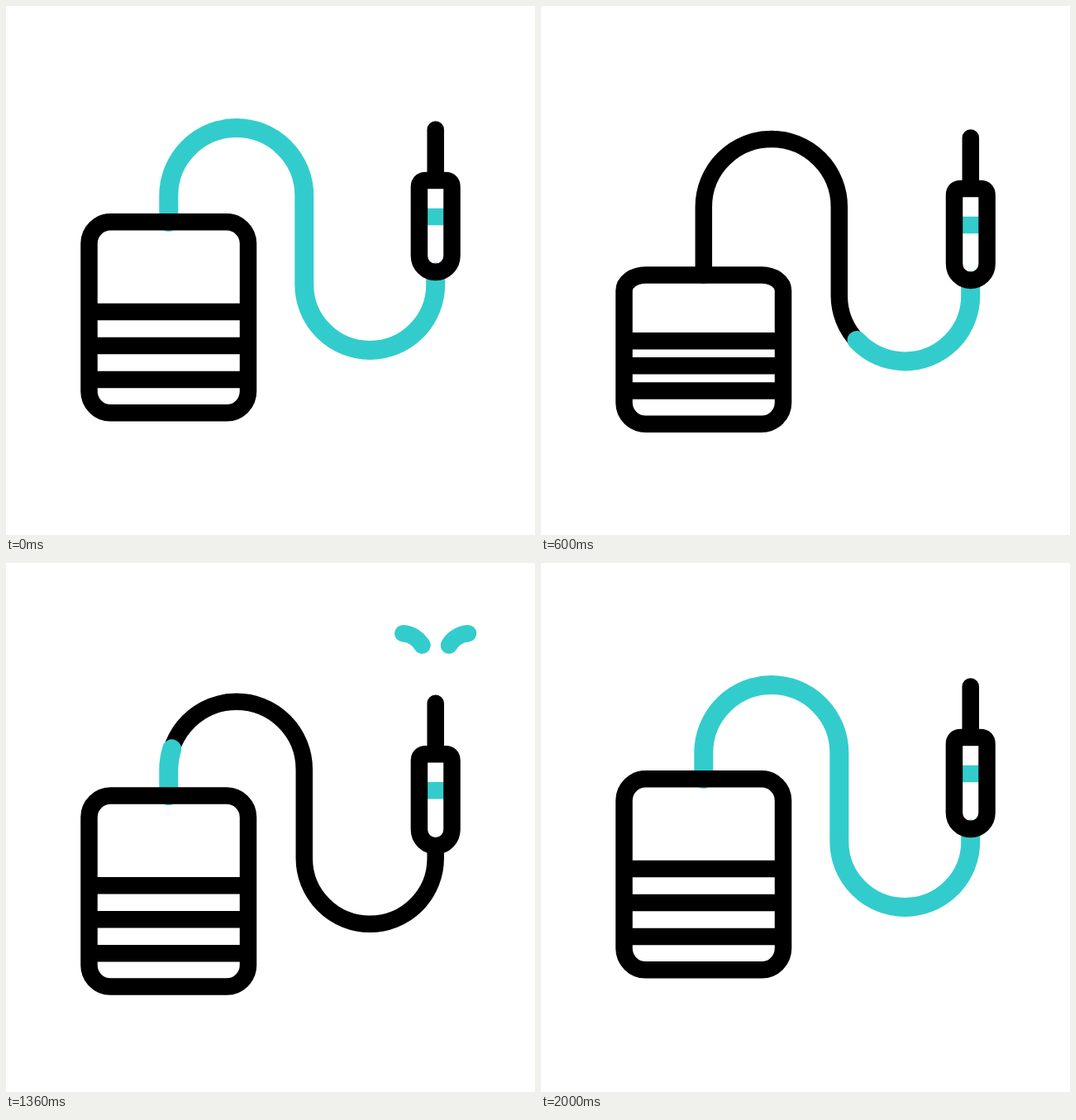
An HTML page for the animation above (2.12 s loop, 640x640 px).

```html
<!DOCTYPE html>
<html lang="en">
<head>
<meta charset="utf-8">
<title>Pedal and plug</title>
<style>
html, body { margin: 0; height: 100%; overflow: hidden; background: #fff; }
svg { display: block; width: 100vw; height: 100vh; fill: none; stroke: #000; stroke-width: 20.5; stroke-linecap: round; stroke-linejoin: round; }
.teal { stroke: #3cc; }
#glow { stroke-width: 23; }
</style>
</head>
<body>
<svg viewBox="0 0 640 640">
  <g id="all">
    <path id="wire"/>
    <path id="glow" class="teal" pathLength="1"/>
    <path id="box"/>
    <g id="plug">
      <path class="teal" stroke-linecap="butt" d="M500 255H539.5"/>
      <path d="M519.7 149.5V211M508 211H531.5Q539.5 211 539.5 219V302.2A19.8 19.8 0 0 1 499.9 302.2V219Q499.9 211 508 211Z"/>
    </g>
    <path id="right" class="teal spark" pathLength="1" d="M532 94A29 29 0 0 1 561 65"/>
    <path id="left" class="teal spark" pathLength="1" d="M507.4 94A29 29 0 0 0 478.4 65"/>
  </g>
</svg>
<script>
const LOOP = 2120, STEP = 40;
const $ = id => document.getElementById(id);
const set = (id, name, value) => $(id).setAttribute(name, value);

// cubic-bezier(.5, 0, .5, 1) in closed form
function ease(t, from, to) {
  const x = Math.min(1, Math.max(0, (t - from) / (to - from)));
  const u = 0.5 + Math.sinh(Math.asinh(4 * x - 2) / 3);
  return u * u * (3 - 2 * u);
}

// Eased value through [time, value] keys
const track = (t, keys) => keys.slice(1).reduce((value, [time, next], i) =>
  value + (next - keys[i][1]) * ease(t, keys[i][0], time), keys[0][1]);

// Show only the part of a path between two fractions of its length
function trim(id, start, end) {
  set(id, "visibility", end - start > 0.0005 ? "visible" : "hidden");
  set(id, "stroke-dasharray", `${Math.max(0, end - start)} 2`);
  set(id, "stroke-dashoffset", -start);
}

function draw(t) {
  const drop = track(t, [[310, 0], [980, 36.5], [1784, 0]]);
  const press = track(t, [[67, 0], [493, 64], [840, -14], [1160, 0]]);
  const lift = track(t, [[445, 0], [980, 24], [1320, 0]]);

  set("all", "transform", `translate(0 ${drop})`);
  set("plug", "transform", `translate(${lift * 0.025} ${-lift})`);

  // The box squashes towards its lowest stripe
  const base = 452, scale = 1 - press / 190.7;
  const sy = y => base + (y - base) * scale;
  const top = sy(261.3), shoulder = sy(287.3), ry = 26 * scale;
  const stripes = [370, 411, base].map(y => `M100.5 ${sy(y)}H293`).join("");
  set("box", "d", `M126.5 ${top}H267A26 ${ry} 0 0 1 293 ${shoulder}V466.3
    A26 26 0 0 1 267 492.3H126.5A26 26 0 0 1 100.5 466.3V${shoulder}
    A26 ${ry} 0 0 1 126.5 ${top}Z${stripes}`);

  const cord = `M196.8 ${top}V229.5A82 82 0 0 1 360.8 229.5V337
    A79.45 79.45 0 0 0 519.7 337V${322 - lift}`;
  set("wire", "d", cord);
  set("glow", "d", cord);
  if (t < 1100) trim("glow", ease(t, 57, 947), 1);
  else trim("glow", 0, ease(t, 1176, 1982));

  for (const id of ["left", "right"])
    trim(id, ease(t, 1160, 1640), ease(t, 1110, 1410));
}

const began = performance.now();
function frame() {
  const t = (performance.now() - began) % LOOP;
  draw(Math.floor(t / STEP) * STEP);
  requestAnimationFrame(frame);
}
frame();
</script>
</body>
</html>
```
